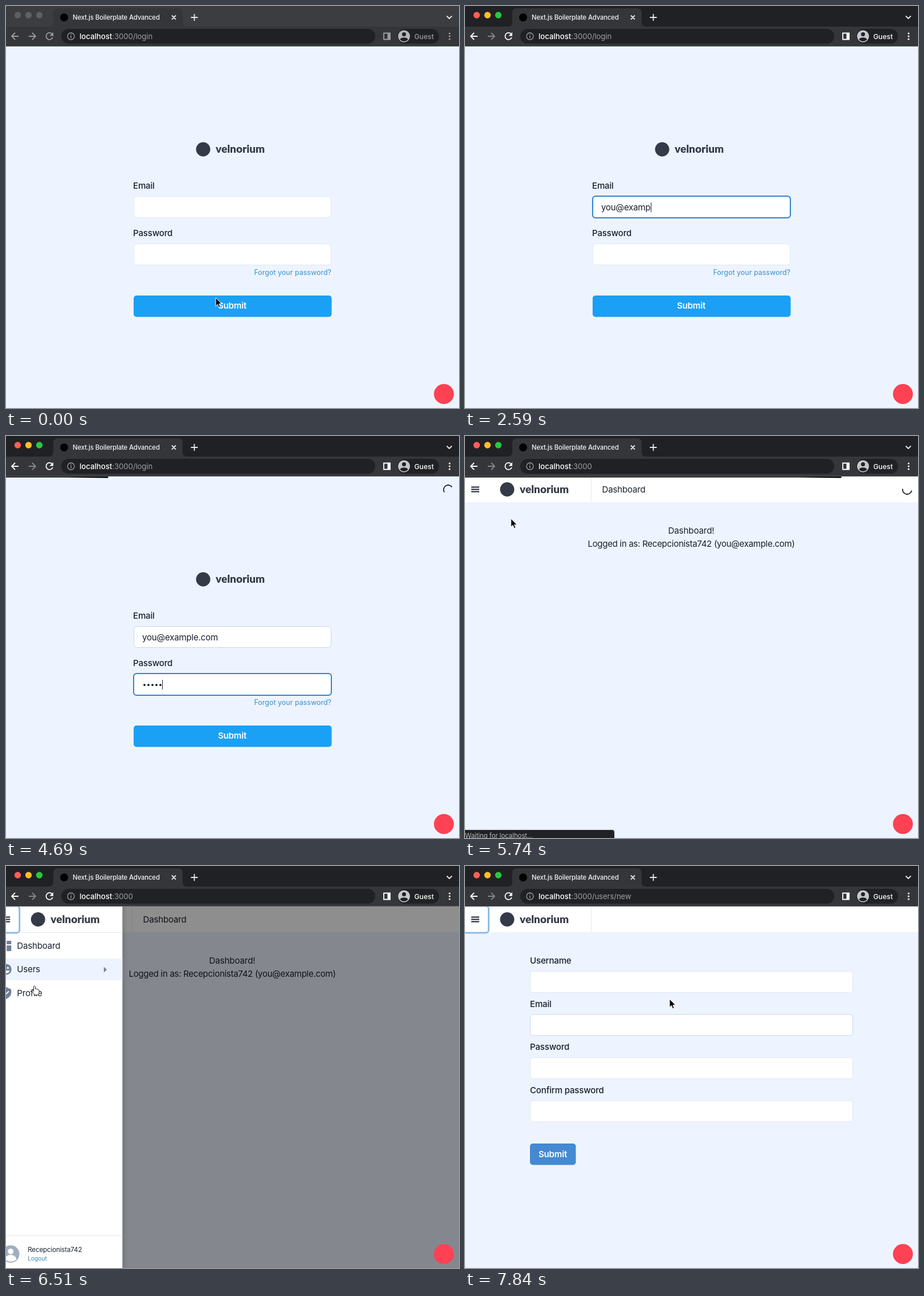
An HTML page that plays this animation: 795x704 px, repeating every 8 s.

```html
<!DOCTYPE html>
<html lang="en">
<head>
<meta charset="utf-8">
<title>Login flow</title>
<style>
  html, body { margin: 0; width: 100%; height: 100%; overflow: hidden; background: #edf4ff; }
  svg { display: block; --strip: #202124; --icon: #fff; --fwd: #85868a; --avatar: #c4c7cc; }
  svg.dim { --strip: #3c3d40; --icon: #9b9c9f; --fwd: #97989b; --avatar: #b4b6ba; }
  text { font: 15.1px Inter, sans-serif; letter-spacing: -.2px; fill: #1a202c; white-space: pre; }
  .label { font-weight: 500; }
  .btn { font-weight: 600; fill: #fff; text-anchor: middle; }
  .mid { text-anchor: middle; letter-spacing: -.32px; }
  .word { font: 900 19px Lato, sans-serif; letter-spacing: 0; fill: #353a48; }
  .field { fill: #fff; stroke: #dfe7f2; }
  .hover { stroke: #cbd5e0; }
  .focus { fill: none; stroke: #3182ce; stroke-width: 2; }
  .ring { fill: none; stroke: #8fbbe5; stroke-width: 3; }
  .rule { stroke: #e2e8f0; }
  .line { fill: none; stroke-width: 1.8; }
  .small { font-size: 11.5px; letter-spacing: -.1px; }
  .ico { fill: #718096; }
  .url { font-size: 13.2px; letter-spacing: 0; fill: #9aa0a6; }
</style>
</head>
<body>
<svg id="stage" width="795" height="704" viewBox="0 0 795 704">
  <defs>
    <linearGradient id="shade"><stop stop-opacity=".1"/><stop offset="1" stop-opacity="0"/></linearGradient>
    <g id="brand"><circle cx="74" cy="93.5" r="12.5" fill="#353a48"/><text class="word" x="96" y="99.5">velnorium</text></g>
    <path id="burger" class="line" stroke="#1a202c" d="M11 89.5h14M11 93.5h14M11 97.5h14"/>
    <rect id="ring" class="ring" x="-8" y="70" width="49.5" height="47" rx="5"/>
  </defs>

  <rect width="795" height="704" fill="#edf4ff"/>

  <g id="login">
    <use href="#brand" x="272" y="157.5"/>
    <text class="label" x="223" y="320">Email</text>
    <rect id="emailBox" class="field" x="224.5" y="333.5" width="346" height="37" rx="5"/>
    <rect id="emailFocus" class="focus" x="224" y="333" width="347" height="38" rx="5"/>
    <text id="email" x="239" y="357.5"></text>
    <text class="label" x="223" y="403">Password</text>
    <rect class="field" x="224.5" y="416.5" width="346" height="37" rx="5"/>
    <rect id="passFocus" class="focus" x="224" y="416" width="347" height="38" rx="5"/>
    <g id="dots" fill="#1a202c">
      <circle cx="243" cy="436" r="1.9"/><circle cx="250" cy="436" r="1.9"/><circle cx="257" cy="436" r="1.9"/>
      <circle cx="264" cy="436" r="1.9"/><circle cx="271" cy="436" r="1.9"/>
    </g>
    <rect id="caret" width="1" height="17" fill="#1a202c"/>
    <text x="571" y="471" text-anchor="end" style="font-size:12.5px;letter-spacing:0;fill:#3a8fca">Forgot your password?</text>
    <rect x="224" y="507" width="347.5" height="37.5" rx="5" fill="#1aa0f4"/>
    <text class="btn" x="397" y="530">Submit</text>
  </g>

  <g id="inside">
    <rect y="70" width="795" height="46" fill="#fff"/>
    <use href="#burger"/><use href="#brand"/>
    <path class="rule" d="M221.5 71v45"/>
    <use id="headRing" href="#ring"/>
    <g id="dash">
      <text x="240.5" y="99">Dashboard</text>
      <text class="mid" x="397" y="171" style="letter-spacing:-.1px">Dashboard!</text>
      <text class="mid" x="397" y="193.5">Logged in as: Recepcionista742 (you@example.com)</text>
    </g>
    <g id="create">
      <text class="label" x="114" y="171">Username</text>
      <text class="label" x="114" y="246.5">Email</text>
      <text class="label" x="114" y="322">Password</text>
      <text class="label" x="114" y="397.5">Confirm password</text>
      <rect class="field" x="114.5" y="184.5" width="566" height="37" rx="5"/>
      <rect class="field hover" x="114.5" y="260" width="566" height="37" rx="5"/>
      <rect class="field" x="114.5" y="335.5" width="566" height="37" rx="5"/>
      <rect class="field" x="114.5" y="411" width="566" height="37" rx="5"/>
      <rect x="114" y="486" width="80.5" height="37.5" rx="5" fill="#4489d1"/>
      <text class="btn" x="154" y="509.5">Submit</text>
    </g>
  </g>

  <rect id="overlay" y="70" width="795" height="634"/>

  <g id="drawer">
    <rect x="222" y="70" width="10" height="634" fill="url(#shade)"/>
    <rect y="70" width="222" height="634" fill="#fff"/>
    <path class="rule" d="M0 116.5h222M0 647.5h222"/>
    <use href="#burger"/><use href="#brand"/><use href="#ring"/>
    <path class="ico" d="M9 131h8v10h-8zM9 143h8v6h-8zM19 131h8v6h-8zM19 139h8v10h-8z"/>
    <text x="37" y="145">Dashboard</text>
    <rect id="usersHover" y="162" width="222" height="38" fill="#edf4ff"/>
    <circle class="ico" cx="18" cy="181" r="9.5"/>
    <path fill="#fff" d="M12 183h12a6 5 0 0 1-12 0z"/>
    <circle cx="15" cy="178.5" r="1.8" fill="#fff"/><circle cx="21" cy="178.5" r="1.8" fill="#fff"/>
    <text x="37" y="186">Users</text>
    <path id="arrow" class="ico" d="M-2.5-5L2.5 0L-2.5 5z"/>
    <g id="sub">
      <rect id="newHover" y="245" width="222" height="38" fill="#edf4ff"/>
      <text x="56" y="228">List</text>
      <text x="56" y="269">New</text>
    </g>
    <g id="profile">
      <path class="ico" d="M18 212l9 4v6q0 7-9 11q-9-4-9-11v-6z"/>
      <path class="line" stroke="#fff" d="M13.5 222.5l3 3 6-6"/>
      <text x="37" y="228">Profile</text>
    </g>
    <circle cx="26" cy="679.5" r="15.3" fill="#a0aec0"/>
    <circle cx="26" cy="675" r="5" fill="#fff"/>
    <path fill="#fff" d="M16 689a10 8 0 0 1 20 0a15 15 0 0 1-20 0z"/>
    <text class="small" x="56" y="676">Recepcionista742</text>
    <text x="56" y="691" style="font-size:10.2px;letter-spacing:0;fill:#3a82bd">Logout</text>
  </g>

  <g id="build">
    <circle cx="735" cy="680" r="52" opacity=".02"/>
    <circle cx="735" cy="680" r="37" opacity=".04"/>
    <rect x="717.5" y="654" width="34" height="29.5" rx="3" fill="#303134"/>
  </g>
  <circle cx="768.5" cy="679.5" r="17.5" fill="#ff4154"/>

  <g id="progress">
    <path id="bar"/>
    <path id="spin" class="line" stroke="#1a202c" stroke-width="2" d="M-8 0A8 8 0 0 0 8 0"/>
  </g>

  <g id="status">
    <path id="statusBox" fill="#202124" stroke="#000" stroke-opacity=".1" stroke-width="3" paint-order="stroke"/>
    <text id="statusText" class="small" y="704" style="fill:#b4b7bb"></text>
  </g>

  <g>
    <rect width="795" height="37" fill="var(--strip)"/>
    <path fill="#35363a" d="M0 36H75Q83 36 83 28V12Q83 4 91 4H302Q310 4 310 12V28Q310 36 318 36H795V70H0z"/>
    <rect y="70" width="795" height="1" fill="#5f6368"/>
    <g id="lights"><circle cx="20.5" cy="16" r="5.7"/><circle cx="39.5" cy="16" r="5.7"/><circle cx="58.5" cy="16" r="5.7"/></g>
    <circle cx="102" cy="20" r="7"/>
    <text x="117" y="24" style="font-size:11.3px;font-weight:500;letter-spacing:-.12px;fill:#f1f3f4">Next.js Boilerplate Advanced</text>
    <path class="line" stroke="#e8eaed" d="M291 16.5l7 7m0-7l-7 7M324.5 20h12m-6-6v12M773.5 17.5l4.5 4.5 4.5-4.5"/>
    <path class="line" stroke="var(--icon)" d="M22 53H10.5m5.5-6l-6 6 6 6M81 49a6 6 0 1 0 1 6"/>
    <path fill="var(--icon)" d="M83 46v6.500h-6.500z"/>
    <path class="line" stroke="var(--fwd)" d="M40 53h12m-6-6l6 6-6 6"/>
    <rect x="97" y="40" width="551" height="26" rx="13" fill="#202124"/>
    <circle class="line" cx="114" cy="53" r="6" stroke="#9aa0a6" style="stroke-width:1.3"/>
    <path class="line" stroke="#9aa0a6" style="stroke-width:1.4" d="M114 52v4.5M114 49.3v1.5"/>
    <text class="url" x="129" y="57.5"><tspan font-weight="500" fill="#fff">localhost</tspan><tspan id="path" letter-spacing="-.1"></tspan></text>
    <path class="line" stroke="var(--icon)" d="M663 47.5h11v11h-11z"/>
    <path fill="var(--icon)" d="M669.5 47h5v12h-5z"/>
    <rect x="687" y="40" width="73" height="26" rx="13" fill="#202124"/>
    <circle cx="698.5" cy="53" r="10.5" fill="var(--avatar)"/>
    <circle cx="698.5" cy="49.5" r="3.5" fill="#202124"/>
    <path fill="#202124" d="M691.5 58.5a7.5 5 0 0 1 14 0a9 9 0 0 1-14 0z"/>
    <text x="716.5" y="57.5" style="font-size:12.2px;font-weight:500;letter-spacing:0;fill:var(--icon)">Guest</text>
    <g fill="var(--icon)"><circle cx="778.5" cy="48" r="1.6"/><circle cx="778.5" cy="53" r="1.6"/><circle cx="778.5" cy="58" r="1.6"/></g>
  </g>

  <g id="cursor" stroke-linejoin="round">
    <path id="pointer" stroke="#fff" d="M0 0V14.5L3.4 11.5 5.7 17 8.2 16 5.9 10.6H10.5z"/>
    <path id="hand" fill="#fff" stroke="#222" d="M-1.5 1.2q1.5-2.4 3 0V5.5q1.5-.8 2.4.4 1.6-.7 2.3.6 1.8-.3 1.9 1.5v3.5q0 2-1.4 4.5h-6.5q-1-2.3-4.6-6.2-.3-2 1.6-1.500l1.300 1.300z"/>
    <path id="beam" class="line" stroke="#222" style="stroke-width:1.2" d="M-3-7.5q3 0 3 2V5.5q0 2-3 2M3-7.5q-3 0-3 2M3 7.5q-3 0-3-2"/>
  </g>
</svg>
<script>
const LOOP = 8000, ADDRESS = 'you@example.com';
const keyTimes = [1400, 1540, 1610, 1750, 1890, 1960, 2240, 2450, 2590, 2730, 2800, 3080, 3220, 3360, 3360];
const dotTimes = [3710, 3850, 3920, 4130, 4200];
const mouse = [[0, 368, 511], [70, 368, 511], [350, 430, 440], [630, 452, 384], [980, 452, 384], [1150, 420, 352],
  [5350, 420, 352], [5740, 81, 145], [5950, 17, 94], [6250, 17, 94], [6510, 50, 210], [6650, 46, 190],
  [6850, 46, 190], [7120, 100, 262], [7370, 100, 262], [7490, 150, 258], [7670, 270, 268], [7840, 359, 233]];
const loading = [[4270, 0], [4400, .08], [4800, .28], [5600, .46], [5740, .828], [5800, 1]];

const $ = id => document.getElementById(id);
const set = (id, attrs) => { for (const k in attrs) $(id).setAttribute(k, attrs[k]); };
const show = (id, on) => { $(id).style.display = on ? '' : 'none'; };
const ramp = (t, a, b) => Math.min(1, Math.max(0, (t - a) / (b - a)));
const within = (t, a, b) => t >= a && t < b;
const passed = (times, t) => times.filter(k => k <= t).length;
const write = (id, s) => { if ($(id).textContent !== s) $(id).textContent = s; };

// Linear interpolation through [time, ...values] keys.
function track(keys, t) {
  const i = keys.findIndex(k => k[0] > t);
  if (i < 0) return keys[keys.length - 1].slice(1);
  if (!i) return keys[0].slice(1);
  const a = keys[i - 1], b = keys[i], p = ramp(t, a[0], b[0]);
  return a.slice(1).map((v, j) => v + (b[j + 1] - v) * p);
}

function spring(t) {
  const u = Math.max(0, t) * .0134;
  return 1 - (1 + u) * Math.exp(-u);
}

function drawLogin(t) {
  const typed = passed(keyTimes, t), dots = passed(dotTimes, t);
  write('email', ADDRESS.slice(0, typed));
  $('emailBox').classList.toggle('hover', t > 1050);
  set('emailFocus', { opacity: ramp(t, 1190, 1390) - ramp(t, 3500, 3700) });
  set('passFocus', { opacity: ramp(t, 3430, 3640) });
  [...$('dots').children].forEach((c, i) => { c.style.display = i < dots ? '' : 'none'; });
  show('caret', t > 1190);
  set('caret', t < 3500
    ? { x: 239.5 + $('email').getComputedTextLength(), y: 344 }
    : { x: 239 + 7 * dots, y: 427 });
}

function drawDrawer(t) {
  const open = spring(t - 6200);
  const slide = open * (1 - ramp(t, 7425, 7515)), expand = ramp(t, 6760, 6960);
  set('overlay', { opacity: .48 * open * (1 - ramp(t, 7425, 7528)) });
  show('drawer', slide > 0);
  set('drawer', { transform: `translate(${222 * (slide - 1)})` });
  show('usersHover', within(t, 6420, 7000));
  show('newHover', within(t, 7060, 7425));
  set('arrow', { transform: `translate(192 181.5) rotate(${90 * expand})` });
  set('sub', { opacity: expand });
  set('profile', { transform: `translate(0 ${83 * expand})` });
}

function drawLoading(t) {
  const w = 795 * track(loading, t)[0];
  show('progress', within(t, 4270, 6000));
  set('progress', { opacity: 1 - ramp(t, 5820, 6000) });
  set('bar', { d: `M0 71H${w}V73.5L${w - 75} 72.5H0z` });
  set('spin', { transform: `translate(776 94) rotate(${(t - 5740) * .9 + 10})` });
  const waiting = t < 6500, wide = waiting ? 262 : 145;
  show('status', within(t, 4970, 5900) || within(t, 7120, 7550));
  set('status', { opacity: 1 - ramp(t, 7420, 7550) });
  set('statusBox', { d: `M0 690H${wide - 4}q4 0 4 4V704H0z` });
  write('statusText', waiting ? 'Waiting for localhost...' : 'localhost:3000/users/new');
  show('build', within(t, 7480, 7760));
  set('build', { opacity: 1 - ramp(t, 7640, 7760) });
}

function drawCursor(t) {
  const [x, y] = track(mouse, t);
  const hand = within(t, 5880, 7430), beam = within(t, 1080, 5430);
  show('cursor', !within(t, 1400, 5350));
  set('cursor', { transform: `translate(${x} ${y})` });
  show('hand', hand);
  show('beam', beam);
  show('pointer', !hand && !beam);
}

function frame() {
  const t = performance.now() % LOOP;
  const active = t >= 350, inside = t >= 5600, created = t >= 7630;
  $('stage').classList.toggle('dim', !active);
  ['#ff5f57', '#febc2e', '#28c840'].forEach((c, i) =>
    $('lights').children[i].setAttribute('fill', active ? c : '#5f6063'));
  write('path', created ? ':3000/users/new' : inside ? ':3000' : ':3000/login');
  show('login', !inside);
  show('inside', inside);
  show('dash', !created);
  show('create', created);
  show('headRing', t >= 6200);
  drawLogin(t);
  drawDrawer(t);
  drawLoading(t);
  drawCursor(t);
  requestAnimationFrame(frame);
}
frame();
</script>
</body>
</html>
```
